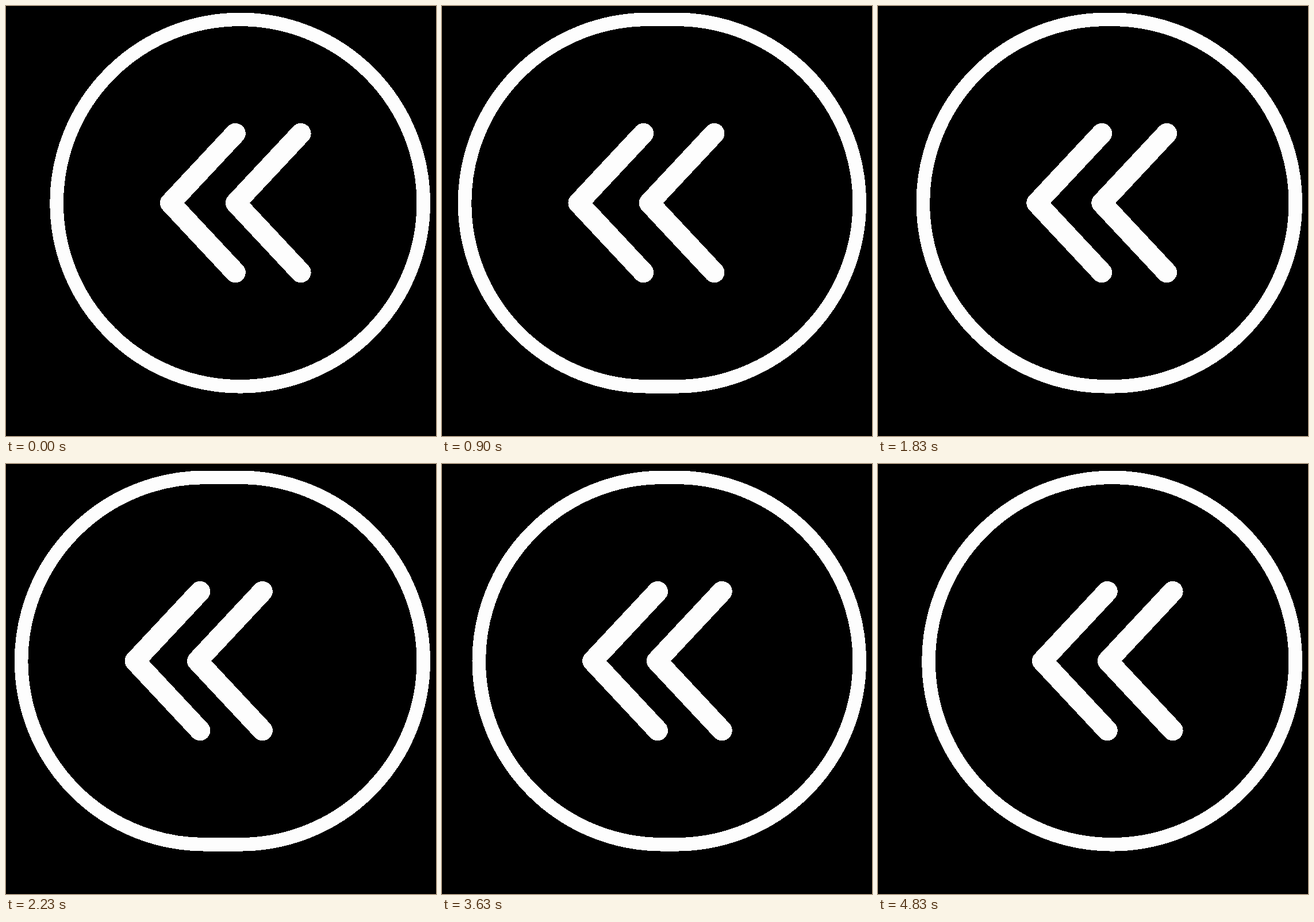
An HTML page that plays this animation: 748 px wide and 748 px high, repeating every 5.11 s.

```html
<!DOCTYPE html>
<html lang="en">
<head>
<meta charset="utf-8">
<title>Stretching back button</title>
<style>
  html, body { margin: 0; width: 100%; height: 100%; overflow: hidden; background: #000; }
  svg { display: block; width: 100%; height: 100%; }
  svg * { fill: none; stroke: #fdfdfd; stroke-linecap: round; stroke-linejoin: round; shape-rendering: crispEdges; }
</style>
</head>
<body>
<svg viewBox="0 0 748 748">
  <rect id="ring" y="23.4" height="638.4" rx="319.2" ry="319.2" stroke-width="23.6"/>
  <path id="front" d="M399 221.7L285.8 342.6L399 463.5" stroke-width="35.6"/>
  <path id="back" d="M512.8 221.7L399.6 342.6L512.8 463.5" stroke-width="35.6"/>
</svg>
<script>
const LOOP = 5110, CYCLE = 34, PEAK = 14;
const [ring, front, back] = ["ring", "front", "back"].map(id => document.getElementById(id));

// Bezier ease with control points (a, 0) and (b, 1).
function ease(x, a, b) {
  if (x <= 0) return 0;
  if (x >= 1) return 1;
  let lo = 0, hi = 1, s = 0.5;
  for (let i = 0; i < 30; i++) {
    s = (lo + hi) / 2;
    const u = 1 - s;
    if (3 * a * s * u * u + 3 * b * s * s * u + s * s * s < x) lo = s; else hi = s;
  }
  return s * s * (3 - 2 * s);
}

// Out to the peak, then back to rest at step `end`.
function swing(n, end) {
  return n < PEAK
    ? ease(n / PEAK, 0.31, 0.54)
    : 1 - ease((n - PEAK) / (end - PEAK), 0.3, 0.37);
}

// Two steps per 100 ms, lasting 30 and 70 ms.
const stepAt = ms => 2 * Math.floor(ms / 100) + (ms % 100 >= 30 ? 1 : 0);

function draw(ms) {
  const n = stepAt(ms % LOOP) % CYCLE;
  const pull = 66.5 * swing(n, 29.5);
  ring.setAttribute("x", 88.1 - pull);
  ring.setAttribute("width", 638.2 + pull);
  front.setAttribute("transform", `translate(${-pull} 0)`);
  back.setAttribute("transform", `translate(${-72.2 * swing(n, 25.3)} 0)`);
}

const start = performance.now();
function tick() {
  draw(performance.now() - start);
  requestAnimationFrame(tick);
}
tick();
</script>
</body>
</html>
```
